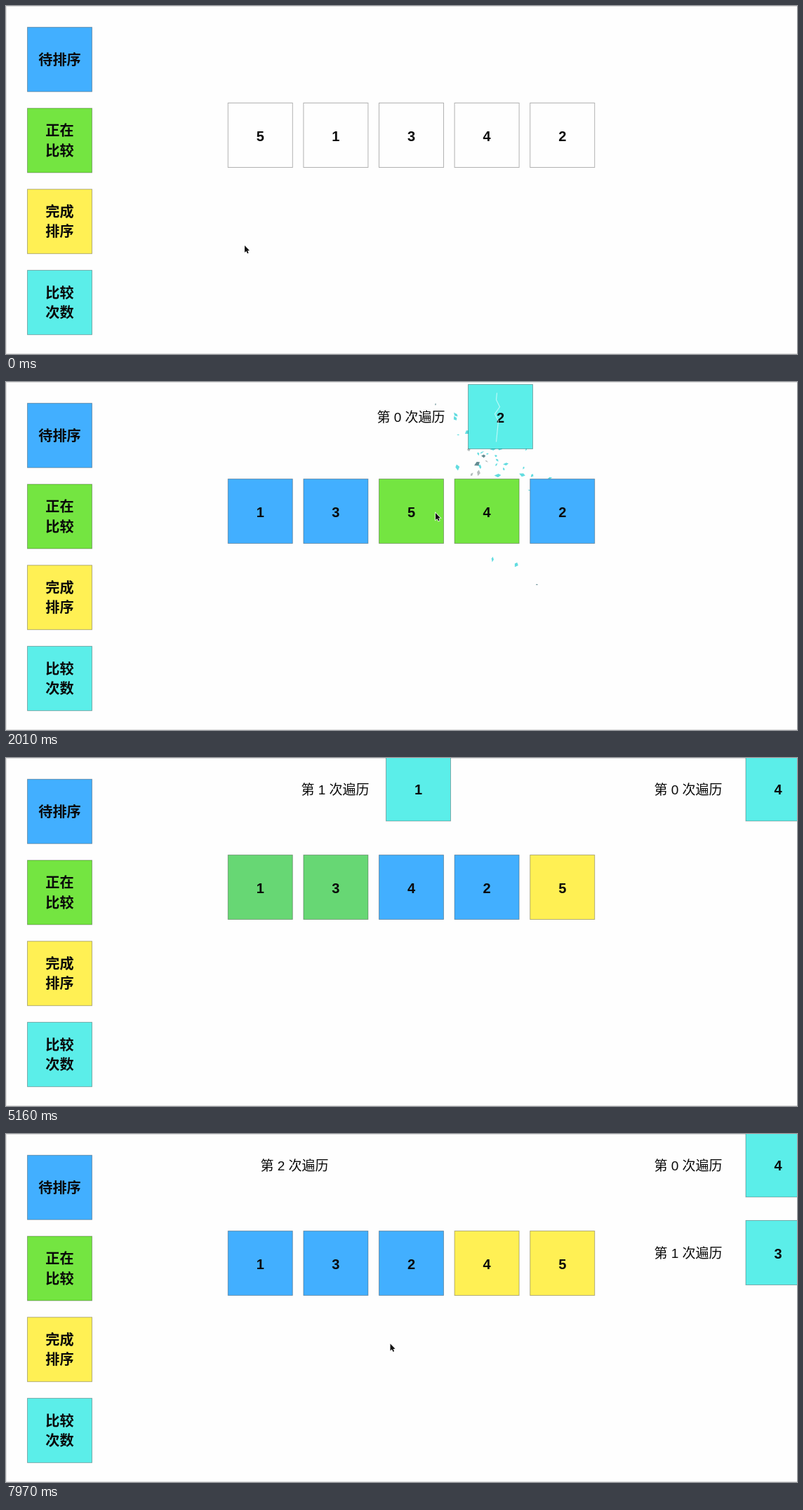
Animation, 1127 px wide and 497 px high, one loop 8000 ms. Source, as an HTML page with a canvas:

```html
<!DOCTYPE html>
<html lang="zh">
<head>
<meta charset="utf-8">
<style>
html, body { margin: 0; width: 100%; height: 100%; overflow: hidden; background: #fefefe; }
canvas { display: block; }
</style>
</head>
<body>
<canvas id="stage" width="1127" height="497"></canvas>
<script>
const ctx = document.getElementById('stage').getContext('2d');
const LOOP = 8000, SIZE = 92;
const CJK = '"Liberation Sans", "Noto Sans CJK SC", "Noto Sans CJK", sans-serif';
const COLORS = {
  w: [254, 254, 254], b: [66, 175, 255], g: [116, 229, 65],
  y: [255, 240, 84], c: [91, 238, 233]
};

// Colour of the five slots: start, pattern, fade length
const PAINT = [
  [100, 'bbbbb', 180], [300, 'ggbbb', 120], [720, 'bggbb', 300],
  [1700, 'bbggb', 250], [2770, 'bbbgg', 250], [3850, 'bbbby', 280],
  [5000, 'ggbby', 220], [5400, 'bggby', 250], [5850, 'bbggy', 230],
  [7100, 'bbbyy', 280]
];
// Start time and left slot of each swap
const SWAPS = [[400, 0], [1250, 1], [2300, 2], [3400, 3], [6600, 2]];
const SWAP_TIME = 290;

const PASSES = [
  { label: 529, box: 658.5, y: 3.5, show: 250, move: 4450, slide: 500, bursts: [1000, 1930, 3070] },
  { label: 421, box: 541.5, y: -2, show: 4850, move: 7650, slide: 290, bursts: [5390, 6240] },
  { label: 363, y: -2, show: 7680, move: Infinity, slide: 1, bursts: [] }
];
const BREAK = 110, LIFE = 640;

const MOUSE = [
  [0, 340, 342], [200, 340, 342], [800, 408, 282], [2010, 612, 187],
  [3140, 672, 300], [4340, 783, 272], [4950, 783, 272]
];

const clamp = v => Math.max(0, Math.min(1, v));
const ease = v => (v = clamp(v), v * v * (3 - 2 * v));
const mix = (a, b, k) => a + (b - a) * k;
const rgb = c => `rgb(${c.map(Math.round)})`;

function random(seed) {
  return () => {
    seed = (seed * 16807) % 2147483647;
    return seed / 2147483647;
  };
}

const rnd = random(4711);
const SHARDS = Array.from({ length: 95 }, () => {
  const angle = rnd() * Math.PI * 2, reach = 35 + 430 * rnd() ** 3;
  return {
    x: 8 + rnd() * 48, y: 30 + rnd() * 85,
    dx: Math.cos(angle) * reach * 0.55, dy: (Math.sin(angle) + 0.3) * reach,
    size: 1.5 + rnd() * 3.5, thin: 0.25 + rnd() * 0.6,
    turn: rnd() * 6, spin: (rnd() - 0.5) * 14,
    color: rnd() < 0.68 ? '#62dce0' : rnd() < 0.5 ? '#638b91' : '#b4bcbc'
  };
});

function text(str, x, y, font, align = 'center') {
  ctx.font = font;
  ctx.textAlign = align;
  ctx.fillStyle = '#0a0a0a';
  ctx.fillText(str, x, y);
}

function box(x, y, color) {
  ctx.fillStyle = rgb(color);
  ctx.fillRect(x, y, SIZE, SIZE);
  ctx.strokeStyle = 'rgba(0,0,0,.3)';
  ctx.lineWidth = 1;
  ctx.strokeRect(x, y, SIZE, SIZE);
}

function numberBox(x, y, n, color) {
  box(x, y, color);
  text(n, x + 46, y + 54, 'bold 20px "Liberation Sans", Arial, sans-serif');
}

function legend() {
  [['b', '待排序'], ['g', '正在', '比较'], ['y', '完成', '排序'], ['c', '比较', '次数']]
    .forEach(([key, ...lines], i) => {
      const y = 30.3 + i * 115.7;
      box(30.5, y, COLORS[key]);
      lines.forEach((line, j) => {
        const mid = y + 53.5 + (j - (lines.length - 1) / 2) * 28.5;
        text(line, 76.5, mid, 'bold 20.2px ' + CJK);
      });
    });
}

function slotColors(t) {
  let now = Array(5).fill(COLORS.w);
  for (const [start, pattern, length] of PAINT) {
    const k = clamp((t - start) / length);
    now = now.map((c, i) => c.map((v, j) => mix(v, COLORS[pattern[i]][j], k)));
  }
  return now;
}

function numbers(t) {
  const order = [5, 1, 3, 4, 2], shift = [0, 0, 0, 0, 0];
  for (const [start, i] of SWAPS) {
    if (t < start) break;
    const k = ease((t - start) / SWAP_TIME);
    if (k === 1) {
      [order[i], order[i + 1]] = [order[i + 1], order[i]];
    } else {
      shift[i] = k;
      shift[i + 1] = -k;
    }
  }
  const colors = slotColors(t);
  order.forEach((n, i) => numberBox(316.3 + (i + shift[i]) * 107.6, 138.5, n, colors[i]));
}

function shatter(x, y, age) {
  const travel = 1 - Math.exp(-age / 150), s = age / 1000;
  for (const p of SHARDS) {
    ctx.save();
    ctx.translate(x + p.x + p.dx * travel, y + p.y + p.dy * travel + 420 * s * s);
    ctx.rotate(p.turn + p.spin * s);
    ctx.globalAlpha = clamp((LIFE - age) / 250);
    ctx.fillStyle = p.color;
    ctx.beginPath();
    ctx.moveTo(-p.size, 0);
    ctx.lineTo(0, -p.size * p.thin);
    ctx.lineTo(p.size, p.size * p.thin * 0.4);
    ctx.lineTo(-p.size * 0.3, p.size * p.thin);
    ctx.fill();
    ctx.restore();
  }
}

function crack(x, y) {
  ctx.strokeStyle = 'rgba(235,255,255,.65)';
  ctx.lineWidth = 1.2;
  ctx.beginPath();
  for (let i = 0; i < 8; i++) ctx.lineTo(x + 41 + (i % 3) * 2 - (i % 2) * 3, y + 12 + i * 10);
  ctx.stroke();
}

function pass(p, index, t) {
  if (t < p.show) return;
  const k = ease((t - p.move) / p.slide);
  const y = mix(p.y, -2 + index * 125.5, k), x = mix(p.box, 1054, k);
  const active = p.bursts.find(b => t >= b && t < b + LIFE);
  if (active) shatter(x, y, t - active);
  ctx.globalAlpha = clamp((t - p.show) / 200);
  text(`第 ${index} 次遍历`, mix(p.label, 924, k) - 0.5, y + 53.5, '19px ' + CJK, 'left');
  if (p.box) {
    const count = 1 + p.bursts.filter(b => t >= b + BREAK).length;
    numberBox(x, y, count, COLORS.c);
    if (active && t - active > 30 && t - active < BREAK) crack(x, y);
  }
  ctx.globalAlpha = 1;
}

function pointer(t) {
  let x = 547.5, y = 299.5;
  if (t < 4950) {
    const i = MOUSE.findIndex(m => m[0] > t), a = MOUSE[i - 1], b = MOUSE[i];
    const k = ease((t - a[0]) / (b[0] - a[0]));
    x = mix(a[1], b[1], k);
    y = mix(a[2], b[2], k);
  } else if (t < 7150) return;
  ctx.beginPath();
  [[0, 0], [0, 10], [2.3, 8], [4, 11.5], [5.6, 10.8], [4.1, 7.4], [7, 7.2]]
    .forEach(([px, py]) => ctx.lineTo(x + px, y + py));
  ctx.closePath();
  ctx.strokeStyle = '#fff';
  ctx.lineWidth = 1.4;
  ctx.stroke();
  ctx.fillStyle = '#111';
  ctx.fill();
}

function draw() {
  const t = performance.now() % LOOP;
  ctx.fillStyle = '#fefefe';
  ctx.fillRect(0, 0, 1127, 497);
  ctx.strokeStyle = '#dedede';
  ctx.lineWidth = 1;
  ctx.strokeRect(0.5, 0.5, 1130, 496);
  legend();
  PASSES.forEach((p, i) => pass(p, i, t));
  numbers(t);
  pointer(t);
  requestAnimationFrame(draw);
}
draw();
</script>
</body>
</html>
```
